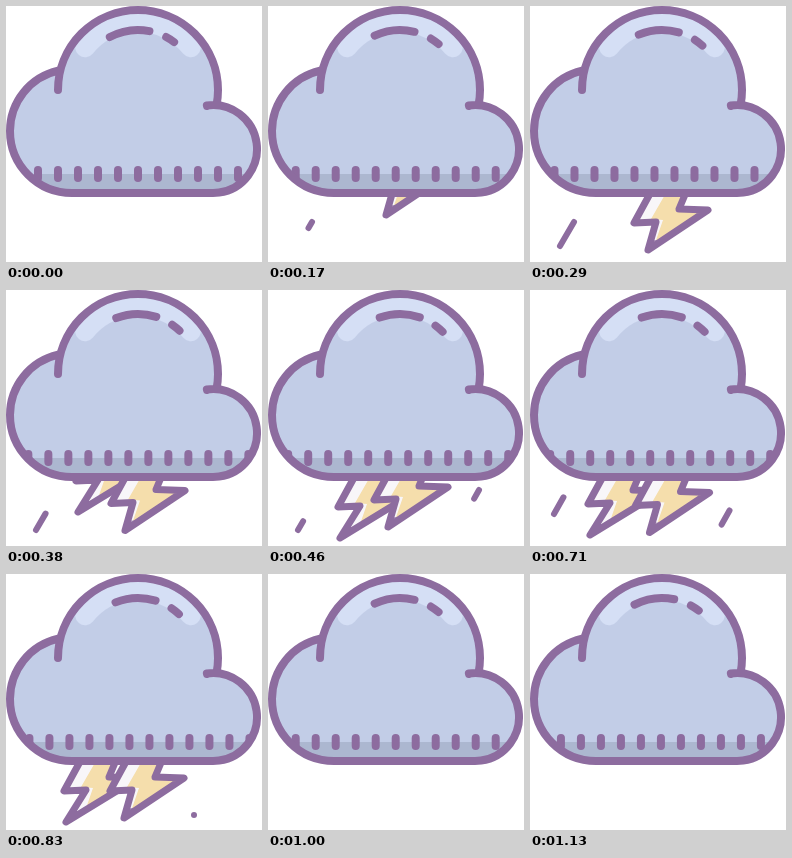
An HTML page with a canvas for the animation above (1180 ms loop, 256 by 256 pixels).

```html
<!DOCTYPE html>
<html lang="en">
<head>
<meta charset="utf-8">
<title>Storm cloud</title>
<style>
html, body { margin: 0; width: 100%; height: 100%; overflow: hidden; background: #fff; }
canvas { display: block; width: 256px; height: 256px; }
</style>
</head>
<body>
<canvas id="stage"></canvas>
<script>
const LOOP = 1180, STEP = 1000 / 24, HALF = 14;
const LINE = '#8d6c9f', CLOUD = '#c2cde7', LIGHT = '#d5dff5', SHADE = '#acb7d0';
const YELLOW = '#f5deac', PALE = '#f8f6f9', TIP = '#b79fc0';

const canvas = document.getElementById('stage');
const ctx = canvas.getContext('2d');
const ratio = window.devicePixelRatio || 1;
canvas.width = canvas.height = 256 * ratio;
ctx.scale(ratio, ratio);
ctx.lineCap = ctx.lineJoin = 'round';

const rad = deg => deg * Math.PI / 180;
const clamp = v => Math.max(0, Math.min(1, v));

// Linear interpolation over [time, x, y] keys.
function track(keys, f) {
  if (f <= keys[0][0]) return keys[0].slice(1);
  for (let i = 1; i < keys.length; i++) {
    const a = keys[i - 1], b = keys[i];
    if (f <= b[0]) {
      const k = (f - a[0]) / (b[0] - a[0]);
      return [a[1] + (b[1] - a[1]) * k, a[2] + (b[2] - a[2]) * k];
    }
  }
  return keys[keys.length - 1].slice(1);
}

function polygon(points) {
  const p = new Path2D();
  points.forEach(([x, y]) => p.lineTo(x, y));
  p.closePath();
  return p;
}

function stroke(path, width, color = LINE) {
  ctx.lineWidth = width;
  ctx.strokeStyle = color;
  ctx.stroke(path);
}

function fill(path, color) {
  ctx.fillStyle = color;
  ctx.fill(path);
}

function segment(x1, y1, x2, y2, width) {
  const p = new Path2D();
  p.moveTo(x1, y1);
  p.lineTo(x2, y2);
  stroke(p, width);
}

// Arc of the dome, angles measured clockwise from the top.
function domeArc(r, from, to, width, color) {
  const p = new Path2D();
  p.arc(132, 84, r, rad(from - 90), rad(to - 90));
  stroke(p, width, color);
}

const body = new Path2D();
body.arc(66, 125, 62, rad(90), rad(257));
body.arc(132, 84, 80, rad(195), rad(371));
body.arc(207, 143, 44, rad(-85), rad(90));
body.closePath();

const outline = new Path2D();
outline.moveTo(52, 84);
outline.arc(132, 84, 80, rad(180), rad(371));
outline.moveTo(201, 100);
outline.arc(207, 143, 44, rad(-98), rad(90));
outline.lineTo(66, 187);
outline.arc(66, 125, 62, rad(90), rad(257));

const makeBolt = (tipX, tipY) => polygon([
  [122, 184], [104, 217], [126, 216], [tipX, tipY], [178, 204], [149, 203], [157, 184]
]);
const glow = polygon([
  [140, 180], [121, 213], [133, 214], [124, 240], [180, 203], [146, 206], [160, 180]
]);

const bolts = [
  {
    shape: makeBolt(106, 248), tip: [106, 248],
    keys: [[7, -34, -66], [10, -34, -6], [11, -34, 0], [14, -43, -6], [17, -46, -3], [20, -46, 0], [23, -46, -66]]
  },
  {
    shape: makeBolt(118, 244), tip: [118, 244],
    keys: [[2, 0, -64], [6, 0, -6], [7, 0, 0], [11, 2, -7], [14, 3, -3], [20, 0, 0], [23, 0, -64]]
  }
];

function drawBolt({ shape, tip, keys }, f) {
  const [dx, dy] = track(keys, f);
  if (dy < -62) return;
  ctx.save();
  ctx.translate(dx, dy);
  fill(shape, PALE);
  ctx.save();
  ctx.clip(shape);
  fill(glow, YELLOW);
  const [x, y] = tip;
  fill(polygon([[x - 4, y - 10], [x + 22, y - 10], [x, y]]), TIP);
  ctx.restore();
  stroke(shape, 7);
  ctx.restore();
}

// Each drop's head runs down its path, then its tail catches up.
const drops = [
  { path: [44, 216, 30, 240], head: [3, 7], tail: [7, 13.3] },
  { path: [211, 200, 188, 241], head: [9, 18.5], tail: [14, 20] },
  { path: [41, 194, 24, 224], head: [13, 17], tail: [15, 19.5] }
];

function drawDrop({ path: [x1, y1, x2, y2], head, tail }, f) {
  const part = ([a, b]) => clamp((f - a) / (b - a));
  const h = part(head), t = part(tail);
  if (f <= head[0] || f > tail[1]) return;
  const x = k => x1 + (x2 - x1) * k, y = k => y1 + (y2 - y1) * k;
  segment(x(t), y(t), x(h), y(h), 6);
}

function drawCloud(swing) {
  fill(body, CLOUD);
  ctx.save();
  ctx.clip(body);
  domeArc(68, -51, 51, 20, LIGHT);
  ctx.fillStyle = SHADE;
  ctx.fillRect(0, 168, 256, 24);
  for (let x = 32 - 15 * swing; x < 244; x += 20) {
    if (x > 20) segment(x, 164, x, 172, 8);
  }
  ctx.restore();

  const turn = 10.5 * swing;
  domeArc(60, -28 + turn, 11 + turn, 8);
  domeArc(60, 28 + turn, 37 + turn, 8);
  stroke(outline, 8);
}

function draw(ms) {
  const f = Math.floor((ms % LOOP + 4) / STEP) % (2 * HALF);
  const swing = 1 - Math.abs(f - HALF) / HALF;
  ctx.fillStyle = '#fff';
  ctx.fillRect(0, 0, 256, 256);
  drops.forEach(d => drawDrop(d, f));
  bolts.forEach(b => drawBolt(b, f));
  drawCloud(swing);
}

const start = performance.now();
function tick() {
  draw(performance.now() - start);
  requestAnimationFrame(tick);
}
tick();
</script>
</body>
</html>
```
